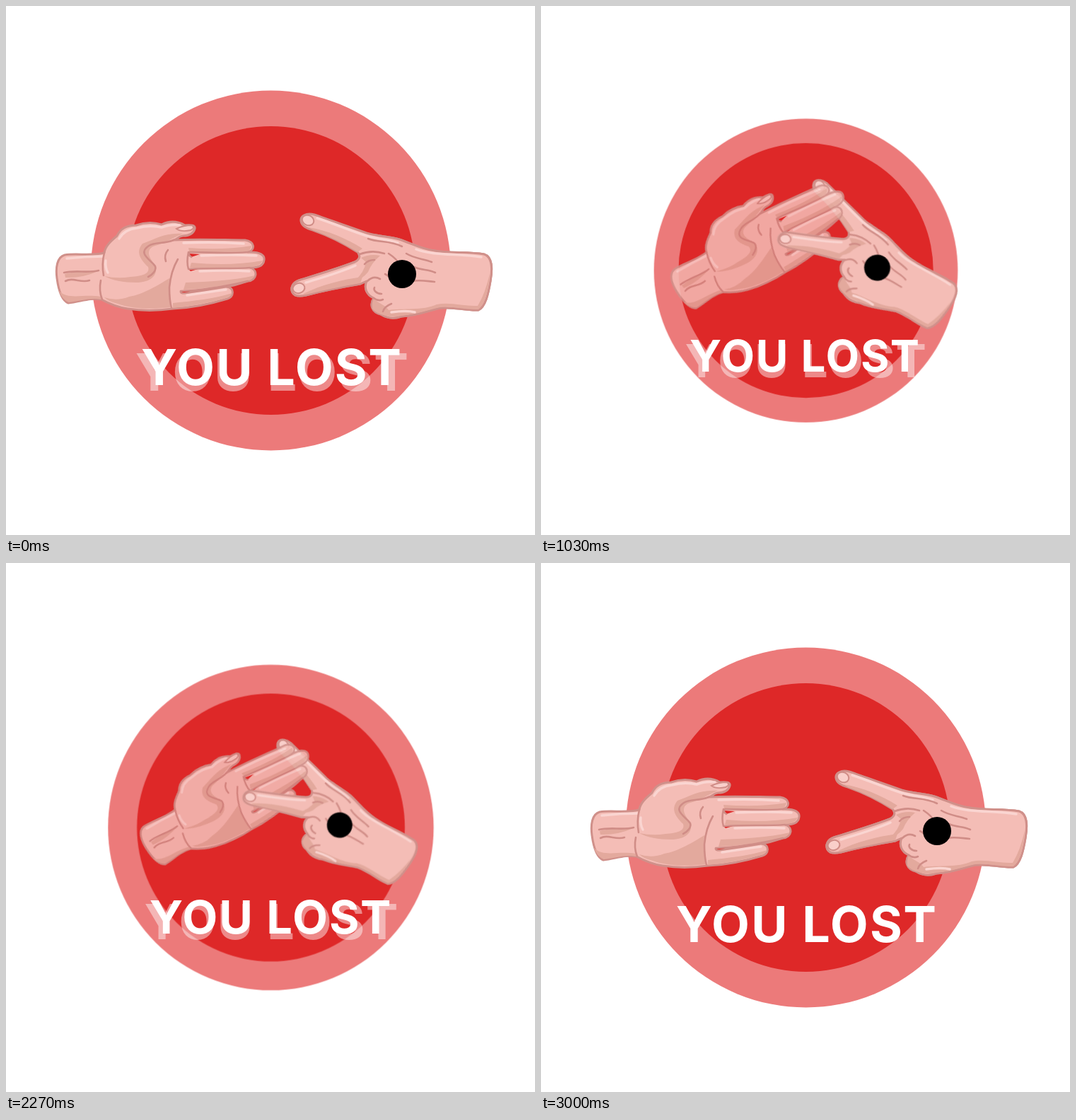
An HTML page that plays this animation: 748 px wide and 748 px high, repeating every 3030 ms.

```html
<!DOCTYPE html>
<html lang="en">
<head>
<meta charset="utf-8">
<title>You lost</title>
<style>
  html, body { margin: 0; width: 100%; height: 100%; overflow: hidden; background: #fff; }
  svg { display: block; width: 100vw; height: 100vh; }

  .ring, .disc, .title, .ghost, .left, .right {
    animation: 3030ms cubic-bezier(.37, 0, .63, 1) infinite;
  }
  .ring { fill: #ec7a7a; transform-origin: 374.5px 374px; animation-name: pulse-far; }
  .disc { fill: #de2828; transform-origin: 374.5px 374px; animation-name: pulse-near; }

  /* lettering */
  text { font: 700 70px Inter, "Open Sans", sans-serif; letter-spacing: .03em; text-anchor: middle; fill: #fff; }
  .title { transform-origin: 355px 374px; animation-name: pulse-near; }
  .ghost { transform-origin: 362px 374px; animation-name: pulse-near, vanish; }
  .ghost text { font-size: 73.5px; opacity: .45; }

  /* hands */
  .left { transform-origin: 218px 365px; animation-name: left-move, left-fade; }
  .right { transform-origin: 545px 370px; animation-name: right-move; }
  .skin { fill: #f4bdb6; stroke: #d0908a; stroke-width: 3; stroke-linejoin: round; }
  .shade { fill: #e3a99d; }
  .line, .light { fill: none; stroke-linecap: round; stroke-linejoin: round; }
  .line { stroke: #d08d87; stroke-width: 2.6; }
  .light { stroke: #fad5d1; stroke-width: 3.5; }
  .nail { fill: #f9cfca; stroke: #d08d87; stroke-width: 2; }
  .gap { fill: #de2828; }

  @keyframes pulse-far { 49.5% { transform: scale(.8); } 99%, 100% { transform: none; } }
  @keyframes pulse-near { 49.5% { transform: scale(.85); } 99%, 100% { transform: none; } }
  @keyframes vanish { 0%, 98.9% { opacity: 1; } 98.95%, 100% { opacity: 0; } }

  /* swing together, shrink, then part again */
  @keyframes left-move {
    0%, 99%, 100% { transform: translate(0, 0) rotate(0deg) scale(1); }
    17%, 20% { transform: translate(82px, -37.5px) rotate(-25.2deg) scale(.975); }
    42.9% { transform: translate(91.6px, -33.5px) rotate(-25.2deg) scale(.9); }
    74.6% {
      transform: translate(91.6px, -33.5px) rotate(-25.2deg) scale(.9);
      animation-timing-function: cubic-bezier(.65, 0, .35, 1);
    }
  }
  @keyframes right-move {
    0%, 99%, 100% { transform: translate(0, 0) rotate(0deg) scale(1); }
    17%, 20% { transform: translate(-71.5px, -15px) rotate(25.2deg) scale(.975); }
    42.9% { transform: translate(-82px, -12.5px) rotate(25.2deg) scale(.9); }
    74.6% {
      transform: translate(-82px, -12.5px) rotate(25.2deg) scale(.9);
      animation-timing-function: cubic-bezier(.65, 0, .35, 1);
    }
  }
  @keyframes left-fade {
    0%, 19.8% { opacity: 1; }
    45%, 55% { opacity: .76; }
    75% { opacity: .88; }
    85%, 100% { opacity: 1; }
  }
</style>
</head>
<body>
<svg viewBox="0 0 748 748" role="img" aria-label="Scissors beats paper: you lost">
  <defs>
    <!-- everything but the upper finger -->
    <clipPath id="front">
      <path d="M390 460V372L500 350L525 316H710V460Z"/>
    </clipPath>

    <g id="scissors">
      <path class="skin" d="M676 351C653 347 628 350 606 346C588 344 574 336 556 330C543 326 526 326 510 321
        C485 312 458 303 436 295C424 292 416 297 417 304C418 311 424 314 434 317C457 325 480 337 497 348
        C502 353 500 359 493 362C470 371 440 380 414 388C405 391 402 399 405 405C408 411 415 411 424 409
        C450 402 477 397 501 393L510 389C506 398 509 408 520 413C514 422 517 433 530 436
        C538 441 548 443 559 439C580 438 596 431 614 427C632 425 650 431 668 430
        C678 425 682 407 685 389C688 371 688 355 676 351Z"/>
      <path class="shade" d="M427 313C455 317 482 329 504 343L497 348C480 337 457 325 434 317Z
        M420 407C447 394 474 387 504 383L501 392C477 396 450 402 424 408Z"/>
      <path class="shade" d="M520 413C526 421 536 422 541 430C560 427 590 431 609 422C628 418 648 425 667 424
        Q678 406 684 378Q681 418 668 429C650 430 632 424 614 426C596 430 580 436 559 438
        C542 442 522 435 518 428Q517 419 520 413Z"/>
      <path class="shade" d="M502 356Q515 350 529 353Q517 363 512 376Q504 386 493 389Q507 376 509 362Z"/>
      <path class="light" d="M440 300C465 308 487 318 510 325C527 330 540 330 554 335
        M424 391C447 384 472 377 494 367M580 344C602 353 640 350 672 355M545 433Q567 430 578 433"/>
      <path class="line" d="M512 329C527 335 542 331 560 340M500 351C513 346 523 346 535 350
        M566 350C579 358 590 357 602 362M577 369C588 374 597 372 607 377M574 389C586 387 594 389 606 390
        M511 389C516 384 522 382 529 386M521 398C519 402 524 407 531 407M520 413C524 416 529 417 533 415
        M533 432Q535 425 545 421M507 365Q512 359 521 359M541 350Q552 357 560 369M536 379Q546 384 552 394"/>
      <ellipse class="nail" cx="427" cy="303" rx="8.5" ry="7" transform="rotate(25 427 303)"/>
      <ellipse class="nail" cx="414" cy="399" rx="8.5" ry="7" transform="rotate(-16 414 399)"/>
      <circle cx="560" cy="379" r="20"/>
    </g>
  </defs>

  <circle class="ring" cx="374.5" cy="374" r="254.5"/>
  <circle class="disc" cx="374.5" cy="374" r="204"/>

  <g class="ghost"><text x="377" y="544.5">YOU LOST</text></g>
  <g class="title"><text x="376" y="536">YOU LOST</text></g>

  <g class="right"><use href="#scissors"/></g>

  <g class="left">
    <path class="skin" d="M83 352C100 349 119 354 139 349C140 339 150 331 157 325C162 314 172 310 184 310
      C198 305 210 306 220 309C232 303 244 305 253 310C262 309 268 310 267 315C265 322 258 325 250 325
      C243 326 241 331 237 331
      C274 329 310 331 338 331C352 333 353 345 342 348C360 347 366 353 365 359C364 368 356 370 345 370
      C357 373 355 388 342 389C335 391 325 395 312 397C324 399 322 411 313 414C290 421 262 427 236 428
      C215 431 190 431 172 428C158 426 146 421 135 415C119 412 106 418 88 420C78 416 74 400 72 385
      C70 370 72 355 83 352Z"/>
    <path class="shade" d="M193 336C211 330 224 320 250 322C235 328 226 335 208 340C197 346 203 357 211 366
      C216 382 203 391 184 391C166 391 150 388 139 382Q158 386 176 383C192 382 204 379 201 369
      C190 358 183 348 193 336Z"/>
    <path class="shade" d="M174 411C194 408 216 394 231 385Q229 413 233 426C207 429 180 429 158 421Q145 418 139 412
      Q157 418 174 411Z"/>
    <path class="shade" d="M75 403C88 416 108 407 134 411L135 415C119 412 106 417 89 419Q79 415 75 403Z
      M83 379Q106 374 130 375Q108 385 84 384Z"/>
    <path class="shade" d="M258 342C288 344 317 344 347 339Q346 346 340 347Q298 349 259 347Z
      M262 363C296 366 330 366 363 360Q359 369 345 369Q301 371 260 370Z
      M254 391C286 390 321 388 352 381Q348 388 339 389Q289 400 251 401Z
      M236 420C266 417 293 414 320 406Q317 412 311 413Q276 423 236 427Z"/>
    <path class="light" d="M160 329Q167 316 185 314Q203 309 220 313Q234 308 246 310M251 335Q296 333 336 336
      M276 353Q320 351 354 353M274 375Q313 373 344 375M256 409Q289 404 311 401M86 357Q112 354 137 354
      M141 360Q140 370 144 377"/>
    <path class="gap" d="M259 350L274 351L262 355Z M258 372L275 371L261 375Z M247 403C266 403 282 400 302 397
      C286 402 267 405 249 406Z"/>
    <path class="line" d="M342 348C315 350 290 349 260 348Q257 352 262 355M345 370C320 372 290 370 259 372
      M342 389C312 396 280 402 247 403Q246 407 254 406Q283 402 312 397
      M139 349Q135 365 138 381M134 388Q131 403 136 415M82 377C99 373 115 378 131 374M84 389C95 383 105 392 118 388
      M237 331C222 337 211 333 202 339C185 350 205 359 211 368C213 374 207 380 201 383
      M229 345Q223 352 226 361M243 358Q233 375 231 398Q231 416 234 427M258 348Q255 362 258 372"/>
    <path class="nail" d="M241 315Q251 310 263 310Q268 314 261 317Q248 320 241 315Z"/>
  </g>

  <g class="right"><use href="#scissors" clip-path="url(#front)"/></g>
</svg>
</body>
</html>
```
